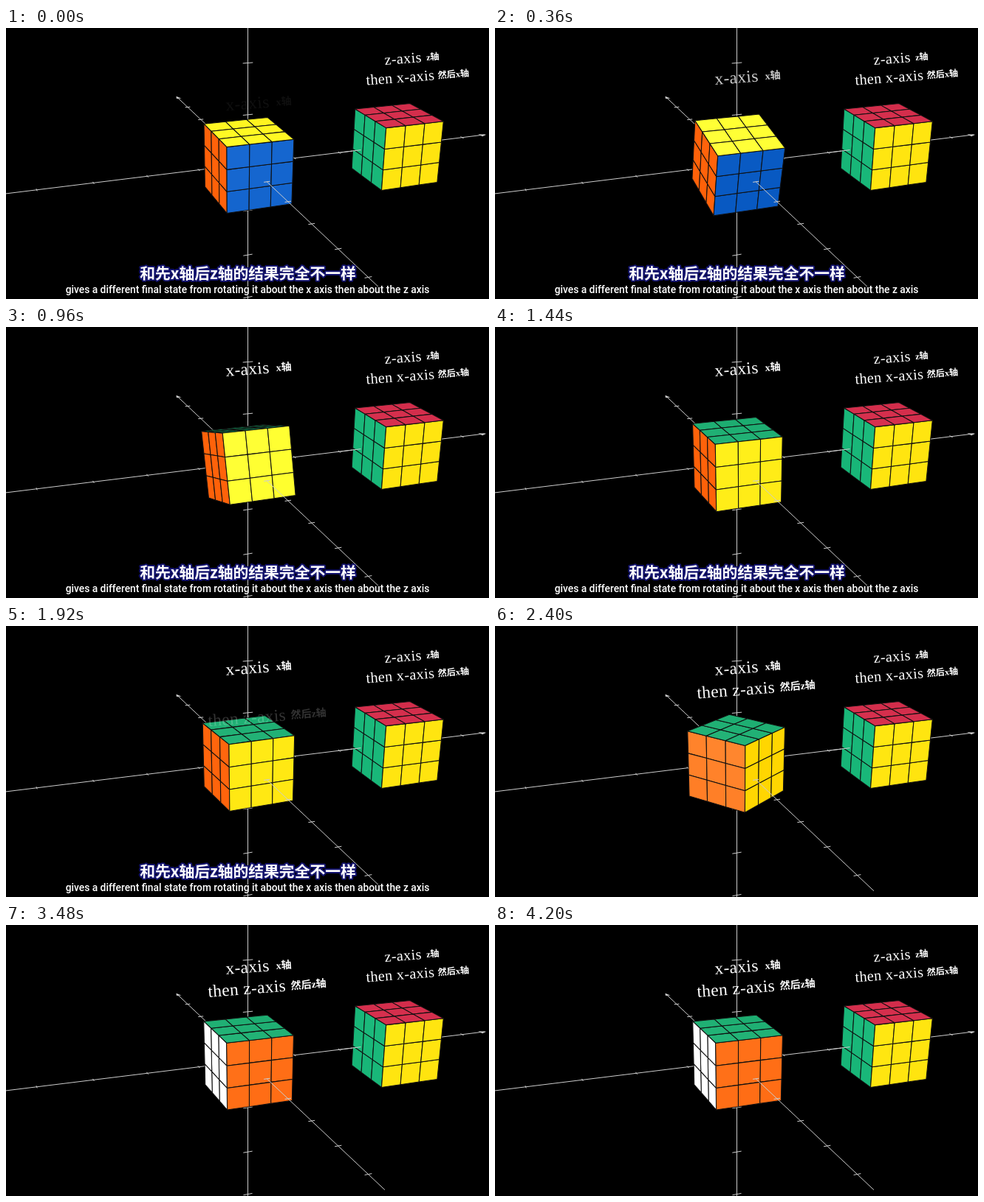
Write an HTML page with a canvas that moves like this. It is 654 px wide and 368 px high and loops after 4.32 s.

```html
<!DOCTYPE html>
<html lang="zh-CN">
<head>
<meta charset="utf-8">
<title>Cube rotations</title>
<style>
html, body { margin: 0; width: 100%; height: 100%; overflow: hidden; background: #000; }
canvas { display: block; }
</style>
</head>
<body>
<canvas id="stage" width="654" height="368"></canvas>
<script>
const ctx = document.getElementById('stage').getContext('2d');
const LOOP = 4320, STEP = 120;
const SPIN = 1800, FADE = 900;
const X_START = -208, Z_START = X_START + SPIN;
const SUBTITLE_END = 2160;
const HALF = 0.67;
const AXIS = '#cdcdcd';
const SUN = [-7, 9, 10];

const RED = [190, 24, 54], GREEN = [0, 158, 96], ORANGE = [255, 88, 0];
const BLUE = [0, 81, 186], YELLOW = [255, 213, 0], WHITE = [255, 255, 255];
const DARK_GREEN = [0, 144, 84];

// Colours per axis as [positive side, negative side].
const leftCube = { x: 0, faces: [[RED, ORANGE], [BLUE, DARK_GREEN], [YELLOW, WHITE]] };
const rightCube = { x: 3.34, faces: [[BLUE, GREEN], [YELLOW, WHITE], [RED, ORANGE]] };

// World axes: x right, w toward the viewer, z up.
function project([x, w, z]) {
  const d = 1 + 0.0234 * x - 0.0257 * z - 0.05 * w;
  return [327.5 + (64.8 * x + 24.45 * w) / d, 184.5 + (-8 * x - 65 * z + 23.1 * w) / d];
}

function progress(t, start, duration) {
  const u = Math.min(1, Math.max(0, (t - start) / duration));
  const sigmoid = v => 1 / (1 + Math.exp(-v));
  const edge = sigmoid(-5);
  return (sigmoid(10 * (u - 0.5)) - edge) / (1 - 2 * edge);
}

function rotate([x, w, z], a, b) {
  const w1 = w * Math.cos(a) + z * Math.sin(a);
  const z1 = z * Math.cos(a) - w * Math.sin(a);
  return [x * Math.cos(b) + w1 * Math.sin(b), w1 * Math.cos(b) - x * Math.sin(b), z1];
}

function shade(color, normal, point) {
  const ray = SUN.map((s, i) => s - point[i]);
  const dot = ray.reduce((sum, r, i) => sum + r * normal[i], 0) / Math.hypot(...ray);
  const light = 0.5 * dot ** 3 * (dot < 0 ? 0.5 : 1) * 255;
  return `rgb(${color.map(c => Math.max(0, Math.min(255, Math.round(c + light)))).join()})`;
}

function path(points) {
  ctx.beginPath();
  points.forEach(p => ctx.lineTo(p[0], p[1]));
}

function line(from, to) {
  path([project(from), project(to)]);
  ctx.stroke();
}

function drawCube(cube, a = 0, b = 0) {
  ctx.strokeStyle = '#101010';
  ctx.lineWidth = 1.05;
  ctx.lineJoin = 'round';
  for (let axis = 0; axis < 3; axis++) {
    for (const side of [1, -1]) {
      const place = (p, q) => {
        const v = [0, 0, 0];
        v[axis] = side * HALF;
        v[(axis + 1) % 3] = p * HALF;
        v[(axis + 2) % 3] = q * HALF;
        const r = rotate(v, a, b);
        r[0] += cube.x;
        return r;
      };
      const [o, u, v] = [place(-1, -1), place(1, -1), place(-1, 1)].map(project);
      const cross = (u[0] - o[0]) * (v[1] - o[1]) - (u[1] - o[1]) * (v[0] - o[0]);
      if (cross * side <= 0) continue;

      const unit = [0, 0, 0];
      unit[axis] = side;
      const normal = rotate(unit, a, b);
      const color = cube.faces[axis][side > 0 ? 0 : 1];
      for (let i = 0; i < 3; i++) {
        for (let j = 0; j < 3; j++) {
          const p = -1 + i * 2 / 3, q = -1 + j * 2 / 3, e = 2 / 3;
          path([place(p, q), place(p + e, q), place(p + e, q + e), place(p, q + e)].map(project));
          ctx.closePath();
          ctx.fillStyle = shade(color, normal, place(p + e / 2, q + e / 2));
          ctx.fill();
          ctx.stroke();
        }
      }
    }
  }
}

function axisStyle() {
  ctx.strokeStyle = ctx.fillStyle = AXIS;
  ctx.lineWidth = 1;
}

function xAxis(from, to) {
  line([from, 0, 0], [to, 0, 0]);
  for (let x = Math.ceil(from); x <= to; x++) if (x) line([x, -0.06, 0], [x, 0.06, 0]);
}

function depthAxis(from, to) {
  line([0, from, 0], [0, to, 0]);
  for (let w = Math.ceil(from); w <= to; w++) if (w) line([-0.06, w, 0], [0.06, w, 0]);
}

function drawBackAxes() {
  axisStyle();
  line([0, 0, -3.2], [0, 0, 2.8]);
  for (let z = -3; z <= 2; z++) if (z) line([-0.1, 0, z], [0.1, 0, z]);
  xAxis(-4.7, 5.6);
  depthAxis(-4.9, 0);
  path([[5.64, 0, 0], [5.48, 0.08, 0], [5.48, -0.08, 0]].map(project));
  ctx.fill();
  path([[0, -4.95, 0], [0.07, -4.75, 0], [-0.05, -4.75, 0]].map(project));
  ctx.fill();
}

function drawFrontAxes() {
  axisStyle();
  xAxis(2.02, 2.5);
  depthAxis(1, 5.5);
}

function write(text, x, y, font, spacing) {
  ctx.save();
  ctx.translate(x, y);
  ctx.rotate(-0.077);
  ctx.font = font;
  ctx.letterSpacing = spacing + 'px';
  ctx.fillText(text, 0, 0);
  ctx.restore();
}

function label(latin, x, y, chinese, cx, cy, scale, shown = 1) {
  const drop = 48 * (1 - shown);
  ctx.globalAlpha = shown;
  ctx.fillStyle = '#fff';
  ctx.textAlign = 'left';
  write(latin, x, y + drop, `${23.4 * scale}px "Liberation Serif", serif`, 0.35 * scale);
  write(chinese, cx, cy + drop, `bold ${14 * scale}px "Liberation Serif", "Noto Sans CJK SC", serif`, 0);
  ctx.globalAlpha = 1;
}

function drawSubtitles() {
  const chinese = '和先x轴后z轴的结果完全不一样';
  const english = 'gives a different final state from rotating it about the x axis then about the z axis';
  ctx.textAlign = 'center';
  ctx.lineJoin = 'round';
  ctx.font = 'bold 20.8px "Noto Sans CJK SC", "Noto Sans CJK", sans-serif';
  ctx.strokeStyle = '#14146e';
  ctx.lineWidth = 4;
  ctx.strokeText(chinese, 327.5, 340.5);
  ctx.fillStyle = '#fff';
  ctx.fillText(chinese, 327.5, 340.5);
  ctx.font = '500 13.8px Roboto, sans-serif';
  ctx.strokeStyle = '#000';
  ctx.lineWidth = 2;
  ctx.strokeText(english, 327, 360);
  ctx.fillText(english, 327, 360);
}

function draw(t) {
  ctx.fillStyle = '#000';
  ctx.fillRect(0, 0, 654, 368);
  drawBackAxes();
  drawCube(rightCube);
  const quarter = Math.PI / 2;
  drawCube(leftCube, quarter * progress(t, X_START, SPIN), quarter * progress(t, Z_START, SPIN));
  drawFrontAxes();

  label('z-axis', 513, 50, 'z轴', 569.5, 44, 0.867);
  label('then x-axis', 488, 77.5, '然后x轴', 585, 68.5, 0.867);
  label('x-axis', 298, 67, 'x轴', 366, 60, 1, progress(t, X_START, FADE));
  label('then z-axis', 274, 98, '然后z轴', 386, 87.5, 1, progress(t, Z_START, FADE));
  if (t < SUBTITLE_END) drawSubtitles();
}

const origin = performance.now();
function tick() {
  const t = (performance.now() - origin) % LOOP;
  draw(Math.floor(t / STEP) * STEP);
  requestAnimationFrame(tick);
}
tick();
</script>
</body>
</html>
```
